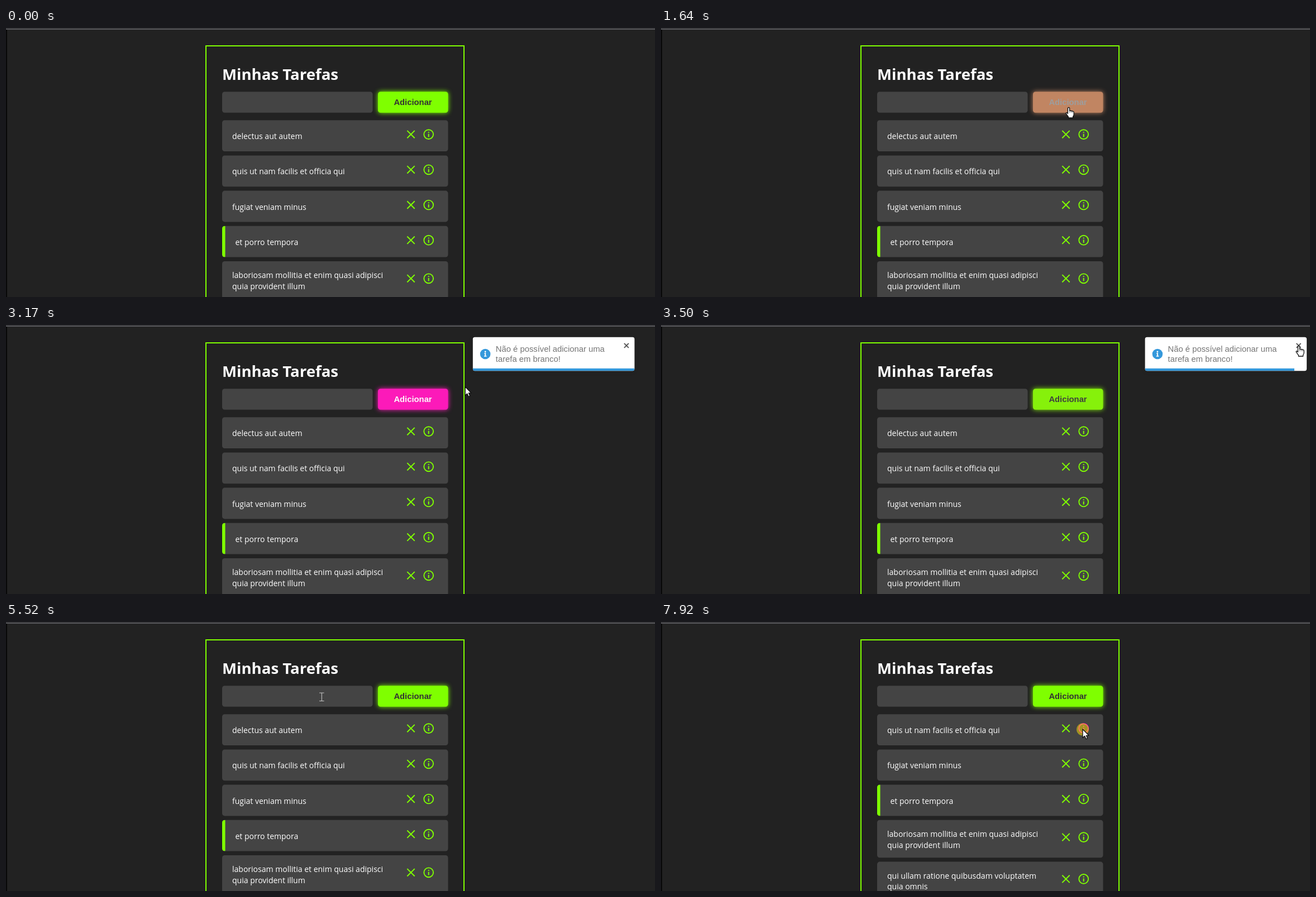
These frames come from a looping animation (1162 by 482 pixels, 8000 ms). An HTML page with a canvas:

```html
<!DOCTYPE html>
<html lang="pt">
<head>
<meta charset="utf-8">
<title>Minhas Tarefas</title>
<style>
  html, body { margin: 0; width: 100%; height: 100%; overflow: hidden; background: #222; }
  canvas { display: block; }
</style>
</head>
<body>
<canvas id="stage" width="1162" height="482"></canvas>
<script>
const ctx = document.getElementById('stage').getContext('2d');
const LOOP = 8000;
const GREEN = [127, 255, 0], PINK = [255, 20, 190], DARK = [51, 51, 51], WHITE = [255, 255, 255];
const BLUE = '#3498db';
const UI = '"Open Sans", "Noto Sans", sans-serif';
const ARIAL = '"Liberation Sans", Arial, sans-serif';

const tasks = [
  { lines: ['delectus aut autem'] },
  { lines: ['quis ut nam facilis et officia qui'] },
  { lines: ['fugiat veniam minus'] },
  { lines: ['et porro tempora'], done: true },
  { lines: ['laboriosam mollitia et enim quasi adipisci', 'quia provident illum'] },
  { lines: ['qui ullam ratione quibusdam voluptatem', 'quia omnis'] }
];

// Pointer path: time, x, y of the hot spot
const path = [
  [110, 1098, 315], [180, 905, 190], [250, 752, 103], [480, 752, 103],
  [680, 806, 106], [1080, 890, 179], [1250, 882, 180], [1490, 788, 150],
  [1620, 730, 142], [2870, 730, 141], [3020, 733, 141], [3150, 793, 118],
  [3350, 1070, 48], [3500, 1142, 37], [3720, 1142, 39], [4300, 1000, 62],
  [4450, 948, 88], [4490, 810, 154], [4510, 722, 154], [4580, 668, 168],
  [4850, 565, 134], [5790, 565, 134], [6100, 704, 243], [6250, 728, 242],
  [6520, 729, 191], [7330, 729, 191], [7520, 755, 192], [8000, 755, 192]
];
const clicks = [[2410, 2580], [6580, 6780], [7920, 8000]];
const enterFrames = [[0, 2715], [.6, -22.6], [.75, 9], [.9, -4.5], [1, 0]];
const exitFrames = [[0, 0], [.2, -18], [1, 1810]];

const clamp = v => Math.max(0, Math.min(1, v));
const mix = (a, b, k) => a + (b - a) * k;
const blend = (a, b, k) => `rgb(${a.map((v, i) => Math.round(mix(v, b[i], k))).join()})`;
const inBox = (p, x, y, w, h) => p.x >= x && p.x <= x + w && p.y >= y && p.y <= y + h;

function bezier(x1, y1, x2, y2) {
  const at = (a, b, s) => 3 * (1 - s) * (1 - s) * s * a + 3 * (1 - s) * s * s * b + s * s * s;
  return x => {
    let lo = 0, hi = 1;
    for (let i = 0; i < 24; i++) {
      const mid = (lo + hi) / 2;
      if (at(x1, x2, mid) < x) lo = mid; else hi = mid;
    }
    return at(y1, y2, lo);
  };
}
const ease = bezier(.25, .1, .25, 1);
const bounce = bezier(.215, .61, .355, 1);

function keyed(frames, k, curve) {
  k = clamp(k);
  for (let i = 1; i < frames.length; i++) {
    const [a, from] = frames[i - 1], [b, to] = frames[i];
    if (k <= b) return mix(from, to, curve((k - a) / (b - a)));
  }
}

function pointerAt(t) {
  if (t < path[0][0]) return null;
  const i = path.findIndex(p => p[0] > t);
  const [t0, x0, y0] = path[i - 1], [t1, x1, y1] = path[i];
  const k = (t - t0) / (t1 - t0);
  return { x: mix(x0, x1, k), y: mix(y0, y1, k) };
}

function box(x, y, w, h, r, fill) {
  ctx.beginPath();
  ctx.roundRect(x, y, w, h, r);
  ctx.fillStyle = fill;
  ctx.fill();
}

function text(str, x, y, font, fill, align = 'left') {
  ctx.font = font;
  ctx.fillStyle = fill;
  ctx.textAlign = align;
  ctx.fillText(str, x, y);
}

function disc(x, y, r, fill) {
  ctx.beginPath();
  ctx.arc(x, y, r, 0, Math.PI * 2);
  ctx.fillStyle = fill;
  ctx.fill();
}

function cross(x, y, r, width, color) {
  ctx.beginPath();
  ctx.moveTo(x - r, y - r); ctx.lineTo(x + r, y + r);
  ctx.moveTo(x + r, y - r); ctx.lineTo(x - r, y + r);
  ctx.lineWidth = width;
  ctx.strokeStyle = color;
  ctx.stroke();
}

function infoIcon(x, y, color) {
  ctx.beginPath();
  ctx.arc(x, y, 8.4, 0, Math.PI * 2);
  ctx.lineWidth = 1.9;
  ctx.strokeStyle = color;
  ctx.stroke();
  ctx.fillStyle = color;
  ctx.fillRect(x - 1, y - 4.7, 2, 1.9);
  ctx.fillRect(x - 1, y - 1, 2, 5.7);
}

const near = (p, x, y) => p && Math.hypot(p.x - x, p.y - y) < 9.5;

// Returns whether the pointer rests on an icon
function drawTasks(list, p) {
  let y = 165.2, hot = false;
  for (const { lines, done } of list) {
    const long = lines.length > 1;
    const h = long ? 67.4 : 55.8;
    const iconY = y + (long ? 30.8 : 25.4);
    box(387, y, 404.5, h, 4.5, '#444');
    if (done) {
      ctx.save();
      ctx.beginPath();
      ctx.rect(387, y, 5.5, h);
      ctx.clip();
      box(387, y, 404.5, h, 4.5, blend(GREEN, GREEN, 0));
      ctx.restore();
    }
    lines.forEach((line, i) =>
      text(line, done ? 410.5 : 405, y + (long ? 30.2 : 34) + i * 19.6, '14px ' + UI, '#fff'));
    const onCross = near(p, 725, iconY), onInfo = near(p, 756.7, iconY);
    cross(725, iconY, 6.7, 2, blend(GREEN, PINK, +onCross));
    infoIcon(756.7, iconY, blend(GREEN, PINK, +onInfo));
    hot = hot || onCross || onInfo;
    y += h + 7.4;
  }
  return hot;
}

function drawButton(t) {
  const k = ease(clamp((t - 1490) / 500)) - ease(clamp((t - 3150) / 500));
  const color = blend(GREEN, PINK, k);
  ctx.save();
  ctx.shadowColor = color;
  ctx.shadowBlur = 9;
  box(666, 114.3, 125.5, 37.4, 4.5, color);
  ctx.restore();
  text('Adicionar', 728.5, 138, 'bold 14.8px ' + ARIAL, blend(DARK, WHITE, k), 'center');
}

function toastX(t) {
  return 858 + (t < 4410
    ? keyed(enterFrames, (t - 1998) / 2000, bounce)
    : keyed(exitFrames, (t - 4410) / 700, ease));
}

function drawToast(t, x) {
  const w = 289.5, y = 21.8, h = 60.4;
  ctx.save();
  ctx.globalAlpha = t < 3200
    ? bounce(clamp((t - 1998) / 1200))
    : 1 - ease(clamp((t - 4550) / 560));
  ctx.save();
  ctx.shadowColor = 'rgba(0,0,0,.1)';
  ctx.shadowBlur = 9;
  ctx.shadowOffsetY = 1;
  box(x, y, w, h, 3.6, '#fff');
  ctx.restore();

  ctx.save();
  ctx.beginPath();
  ctx.roundRect(x, y, w, h, 3.6);
  ctx.clip();
  ctx.fillStyle = BLUE;
  const left = 1 - clamp((Math.min(t, 4450) - 3245) / 3350);
  ctx.fillRect(x, y + h - 4.4, w * left, 4.4);
  ctx.restore();

  const ix = x + 22.3, iy = 52;
  disc(ix, iy, 9.3, BLUE);
  disc(ix, iy - 4, 1.4, '#fff');
  ctx.fillRect(ix - 1.7, iy - 1.6, 2.7, 1.6);
  ctx.fillRect(ix - .8, iy - 1.6, 1.8, 6);
  ctx.fillRect(ix - 2.1, iy + 3, 4.4, 1.6);
  text('Não é possível adicionar uma', x + 41, 48.3, '14.8px ' + ARIAL, '#757575');
  text('tarefa em branco!', x + 41, 65.6, '14.8px ' + ARIAL, '#757575');
  cross(x + 275, 36.8, 4, 1.9, t < 3720 ? '#555' : '#000');
  ctx.restore();
}

const arrow = new Path2D('M0 0V15.6L3.6 12.3L6 17.6L8.6 16.5L6.3 11.3H11Z');
const hand = new Path2D('M-1.6 1.4Q0 -.8 1.5 1.4V6.4Q3 5.4 4.2 6.8Q5.8 6 6.8 7.4' +
  'Q9 6.9 9.2 9V13Q9 15 7.6 16.6V19H-.6V17.2L-4.6 11.6Q-5.4 9.8 -3.6 9.6L-1.6 11.4Z');

function drawPointer(p, kind) {
  ctx.save();
  ctx.translate(p.x, p.y);
  if (kind === 'text') {
    ctx.strokeStyle = '#c4c4c4';
    ctx.lineWidth = 1.1;
    ctx.beginPath();
    ctx.moveTo(-4, -7); ctx.lineTo(4.5, -7);
    ctx.moveTo(-4, 7.5); ctx.lineTo(4.5, 7.5);
    ctx.moveTo(.3, -7); ctx.lineTo(.3, 7.5);
    ctx.stroke();
  } else {
    const shape = kind === 'hand' ? hand : arrow;
    ctx.lineJoin = 'round';
    ctx.lineWidth = 1.3;
    ctx.strokeStyle = '#111';
    ctx.fillStyle = '#fff';
    ctx.fill(shape);
    ctx.stroke(shape);
    if (kind === 'hand') {
      ctx.lineWidth = .8;
      ctx.strokeStyle = '#555';
      ctx.stroke(new Path2D('M1.5 6.4V10M4.2 6.8V10M6.8 7.4V10.4'));
    }
  }
  ctx.restore();
}

function draw(t) {
  const p = pointerAt(t);
  ctx.fillStyle = '#222';
  ctx.fillRect(0, 0, 1162, 482);
  ctx.fillStyle = '#2a2a2c';
  ctx.fillRect(0, 0, 1162, 1);
  ctx.fillStyle = '#56565a';
  ctx.fillRect(0, 1, 1162, 2);
  ctx.fillStyle = '#080808';
  ctx.fillRect(0, 3, 2, 479);

  ctx.strokeStyle = blend(GREEN, GREEN, 0);
  ctx.lineWidth = 2;
  ctx.strokeRect(358, 32, 462, 500);
  text('Minhas Tarefas', 387, 93, 'bold 27.6px ' + UI, '#fff');
  box(387, 114.3, 269.5, 37.4, 4.5, '#444');
  drawButton(t);
  const onIcon = drawTasks(t < 6780 ? tasks : tasks.slice(1), p);

  if (t >= 5000 && t < 6520 && Math.floor((t - 5020) / 500) % 2 === 0) {
    ctx.fillStyle = '#fff';
    ctx.fillRect(396, 124, 1, 17);
  }

  const showToast = t >= 2870 && t < 4850;
  const tx = toastX(t);
  if (showToast) drawToast(t, tx);
  if (!p) return;

  if (clicks.some(([a, b]) => t >= a && t < b)) disc(p.x, p.y + .5, 11, 'rgba(255,225,0,.5)');
  const onToast = showToast && inBox(p, tx, 22, 289.5, 68);
  const onButton = inBox(p, 666, 114, 126, 38);
  let kind = 'arrow';
  if (inBox(p, 387, 114, 270, 38)) kind = 'text';
  else if ((onIcon && t < 7740) || onToast || onButton) kind = 'hand';
  drawPointer(p, kind);
}

function frame(now) {
  draw(now % LOOP);
  requestAnimationFrame(frame);
}
draw(0);
requestAnimationFrame(frame);
</script>
</body>
</html>
```
